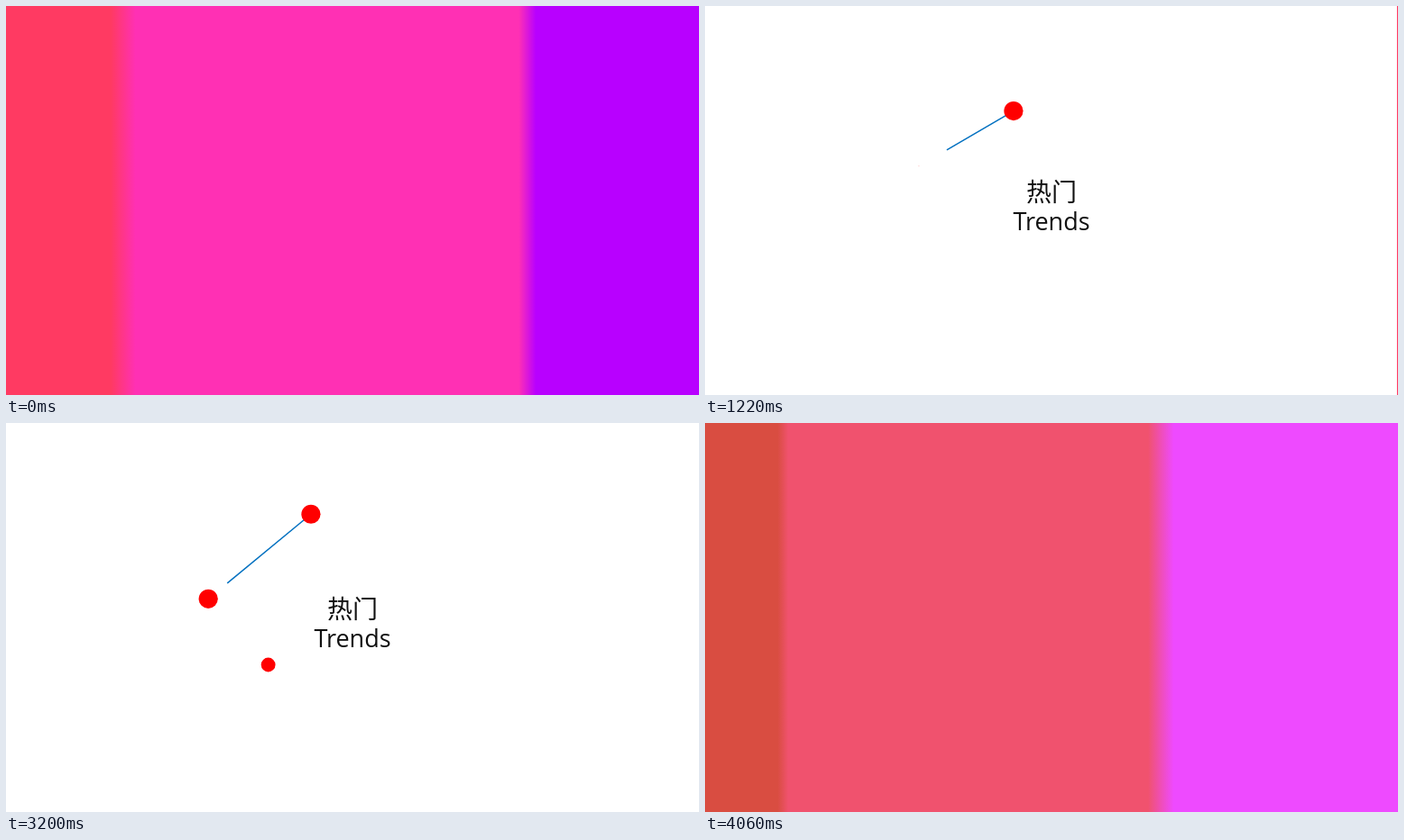
Write an HTML page with a canvas that moves like this. It is 768 px wide and 432 px high and loops after 4080 ms.

```html
<!DOCTYPE html>
<html lang="zh-CN">
<head>
<meta charset="utf-8">
<title>Trends</title>
<style>
  html, body { margin: 0; width: 100%; height: 100%; overflow: hidden; background: #fff; }
  svg, canvas { position: absolute; left: 0; top: 0; }
  text { text-anchor: middle; fill: #111; }
  .zh { font: 28px "Noto Sans CJK SC", "Noto Sans CJK", sans-serif; }
  .en { font: 27px "Open Sans", sans-serif; }
</style>
</head>
<body>
<svg width="768" height="432">
  <text class="zh" x="384" y="216.5">热门</text>
  <text class="en" x="384" y="249">Trends</text>
</svg>
<canvas width="768" height="432"></canvas>
<script>
const W = 768, H = 432, LOOP = 4080, SHUTTER = 7, ZOOM = 400, RADIUS = 10.6;
const ctx = document.querySelector('canvas').getContext('2d');
const clamp = v => Math.min(1, Math.max(0, v));

// Position at 1840 ms, drift in px/ms, start of zoom in and of zoom out
const dots = [
  { x: 340.7, y: 111.8, vx: -.00203, vy: -.00777, from: 396, to: 3628 },
  { x: 233, y: 183.3, vx: -.00646, vy: .0088, from: 1210, to: 3364 },
  { x: 279, y: 275.3, vx: .00854, vy: -.005, from: 1420, to: 3100 }
];
const lines = [
  { a: 0, b: 1, from: 1080, to: 3164 },
  { a: 1, b: 2, from: 1300, to: 2900 }
];
// Edges leave to the right: gap left at time 0 and time of arrival
const leaving = [
  { color: '#ff3a62', gap: 990, end: 1508 },
  { color: '#ff30b4', gap: 642, end: 656 },
  { color: '#b800ff', gap: 193, end: 280 }
];
const entering = [
  { color: '#d94d41', start: 3687 },
  { color: '#f0526e', start: 3857 },
  { color: '#ee4aff', start: 4003 }
];

const presence = (t, part, time) => clamp((t - part.from) / time) - clamp((t - part.to) / time);
const place = (dot, t) => [dot.x + dot.vx * (t - 1840), dot.y + dot.vy * (t - 1840)];

function drawLine(t, line) {
  const part = presence(t, line, 200);
  if (part <= 0) return;
  const [x1, y1] = place(dots[line.a], t), [x2, y2] = place(dots[line.b], t);
  ctx.beginPath();
  ctx.moveTo(x1, y1);
  ctx.lineTo(x1 + (x2 - x1) * part, y1 + (y2 - y1) * part);
  ctx.stroke();
}

function drawDot(t, dot) {
  ctx.beginPath();
  ctx.arc(...place(dot, t), RADIUS * presence(t, dot, ZOOM), 0, 2 * Math.PI);
  ctx.fill();
}

// Fills everything right of x; the edge is smeared by its speed
function drawPanel(color, x, speed) {
  const half = Math.max(.5, speed * SHUTTER) / 2;
  const fill = ctx.createLinearGradient(x - half, 0, x + half, 0);
  fill.addColorStop(0, color + '00');
  fill.addColorStop(1, color);
  ctx.fillStyle = fill;
  ctx.fillRect(0, 0, W, H);
}

function draw(t) {
  ctx.clearRect(0, 0, W, H);
  ctx.strokeStyle = '#0070c0';
  ctx.lineWidth = 1.5;
  ctx.fillStyle = '#f00';
  lines.forEach(line => drawLine(t, line));
  dots.forEach(dot => drawDot(t, dot));

  for (const { color, gap, end } of leaving) {
    if (t >= end) continue;
    const left = 1 - t / end;
    drawPanel(color, W - gap * left ** 4, 4 * gap / end * left ** 3);
  }
  for (const { color, start } of entering) {
    if (t <= start) continue;
    const left = 1 - clamp((t - start) / 307);
    drawPanel(color, W * left ** 2, left && 2 * W / 307 * left);
  }
}

const origin = performance.now();
function tick() {
  draw((performance.now() - origin) % LOOP);
  requestAnimationFrame(tick);
}
tick();
</script>
</body>
</html>
```
